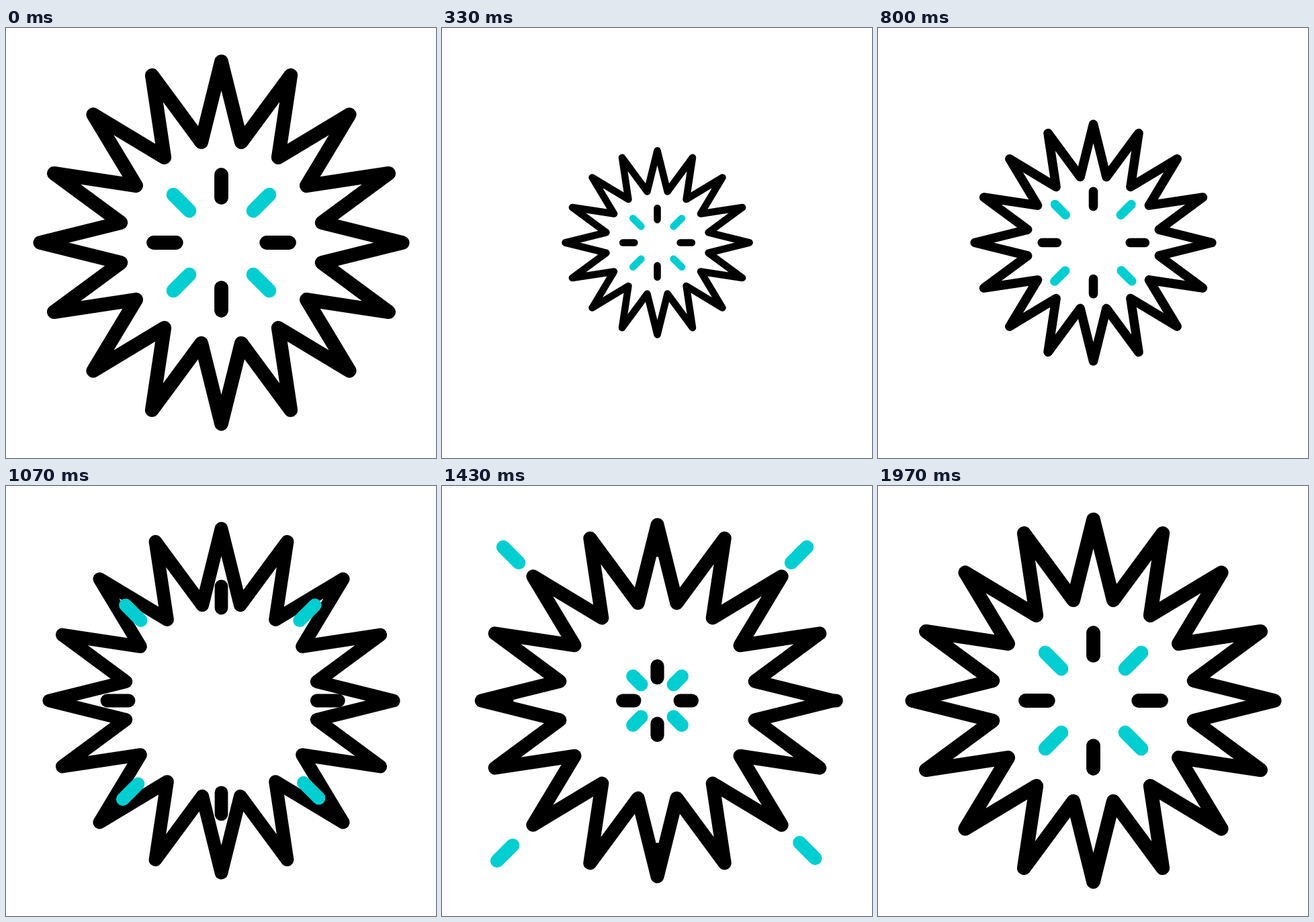
Recreate the animation shown at these times as an HTML page. Size 640 px wide and 640 px high, loop 2.17 s.

```html
<!DOCTYPE html>
<html lang="en">
<head>
<meta charset="utf-8">
<title>Pulsing burst</title>
<style>
  html, body { margin: 0; width: 100%; height: 100%; overflow: hidden; background: #fff; }
  svg { display: block; width: 100vw; height: 100vh; }
</style>
</head>
<body>
<svg viewBox="0 0 640 640">
  <g id="burst" fill="none" stroke="#000" stroke-width="20.8" stroke-linecap="round" stroke-linejoin="round"></g>
</svg>
<script>
const LOOP = 2170, FPS = 30, LAST = 59;
const LOW = 0.428, LOW_AT = 17.9, HIGH = 0.95, HIGH_AT = 32;
const FLY_AT = 22, GROW_AT = 32, GROW_END = 53;
const INNER = 67.2, OUTER = 101;
const CYAN = '#00ced1';

// Drift per step of each ray, clockwise from the top; black rays first
const blackDrift = [[0, -7.8], [8.25, 0], [0, 7.68], [-7.8, 0]];
const cyanDrift = [[7.52, -7.82], [8.13, 8.11], [-8.3, 8.3], [-7.86, -7.82]];

const burst = document.getElementById('burst');
const polar = (r, deg) => {
  const a = deg * Math.PI / 180;
  return [r * Math.sin(a), -r * Math.cos(a)];
};

function add(tag, attrs) {
  const el = document.createElementNS('http://www.w3.org/2000/svg', tag);
  for (const key in attrs) el.setAttribute(key, attrs[key]);
  return burst.appendChild(el);
}

const corners = Array.from({ length: 32 }, (_, i) => polar(i % 2 ? 152.6 : 269.6, i * 11.25));
add('polygon', { points: corners.join(' ') });

const makeRay = (drift, angle, stroke) => ({
  angle, drift,
  leaving: add('line', { stroke }),
  coming: add('line', { stroke })
});
const rays = [
  ...blackDrift.map((d, i) => makeRay(d, i * 90, '#000')),
  ...cyanDrift.map((d, i) => makeRay(d, i * 90 + 45, CYAN))
];

function place(line, angle, size, dx, dy) {
  const [x1, y1] = polar(INNER * size, angle);
  const [x2, y2] = polar(OUTER * size, angle);
  const ends = { x1: x1 + dx, y1: y1 + dy, x2: x2 + dx, y2: y2 + dy };
  for (const key in ends) line.setAttribute(key, ends[key]);
}

function scaleAt(step) {
  if (step < LOW_AT) return LOW + (1 - LOW) * (1 - step / LOW_AT) ** 2.4;
  if (step < HIGH_AT) return LOW + (HIGH - LOW) * (step - LOW_AT) / (HIGH_AT - LOW_AT);
  return HIGH + (1 - HIGH) * (step - HIGH_AT) / (LAST - HIGH_AT);
}

function draw(step) {
  burst.setAttribute('transform', `translate(320.5 319.5) scale(${scaleAt(step)})`);
  const flown = Math.max(0, step - FLY_AT);
  const grown = Math.min(1, (step - GROW_AT) / (GROW_END - GROW_AT));
  for (const { angle, drift, leaving, coming } of rays) {
    place(leaving, angle, 1, drift[0] * flown, drift[1] * flown);
    leaving.style.display = step < LAST ? '' : 'none';
    coming.style.display = grown > 0 ? '' : 'none';
    place(coming, angle, Math.max(0, grown), 0, 0);
  }
}

// Steps begin on whole hundredths of a second
function tick() {
  const ms = Math.floor((performance.now() % LOOP) / 10) * 10;
  draw(Math.min(LAST, Math.floor((ms + 5) * FPS / 1000)));
  requestAnimationFrame(tick);
}
tick();
</script>
</body>
</html>
```
